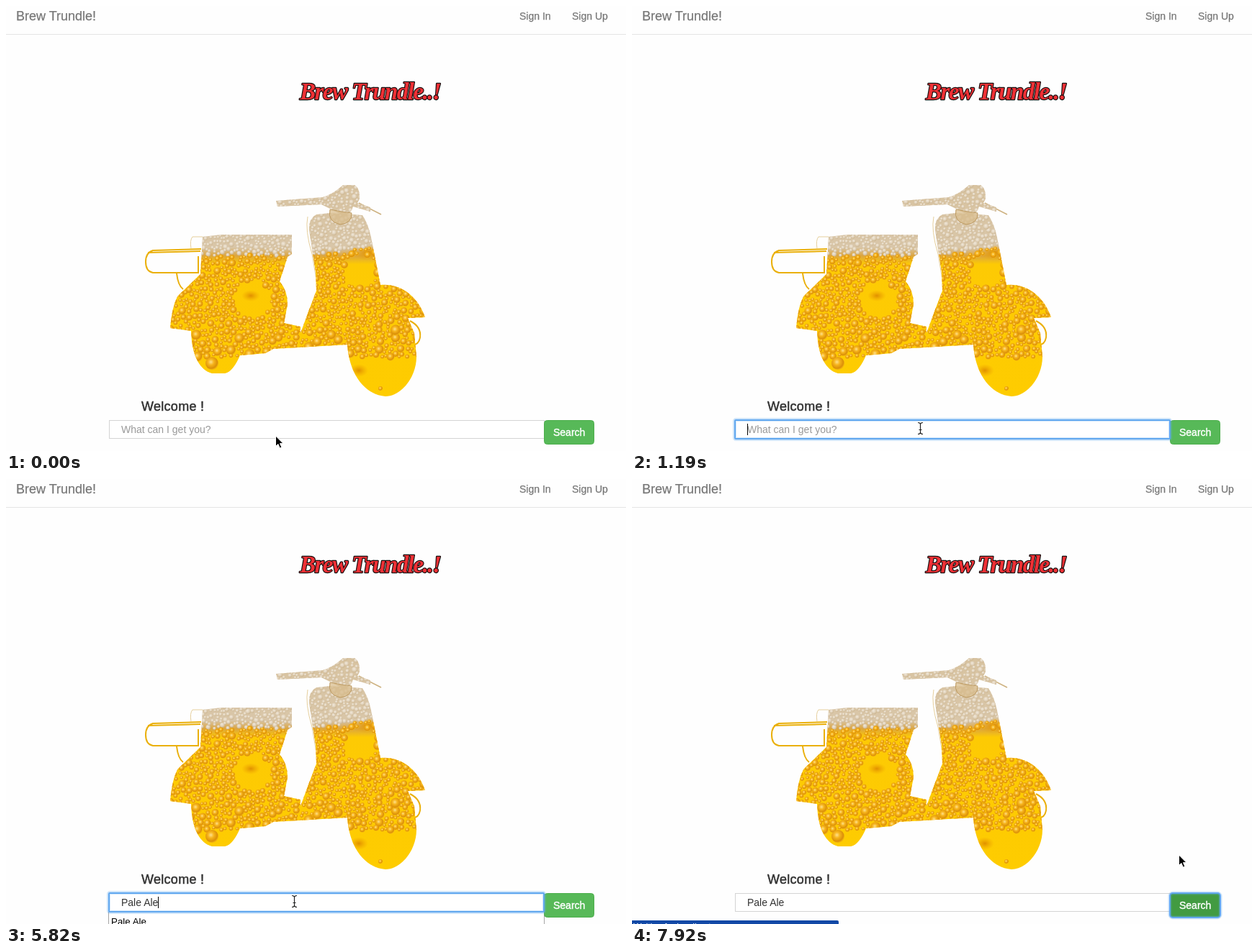
An HTML page that plays this animation: 861x619 px, repeating every 8 s.

```html
<!DOCTYPE html>
<html lang="en">
<head>
<meta charset="utf-8">
<title>Brew Trundle!</title>
<style>
html, body { margin: 0; width: 100%; height: 100%; overflow: hidden; background: #fefefe; }
svg { display: block; font: 14px "Liberation Sans", Arial, sans-serif; }
text { white-space: pre; }
.nav { fill: #777; stroke: #777; stroke-width: .25; }
.title {
  font: italic bold 33px "Liberation Serif", serif; letter-spacing: -1.5px;
  fill: #ee3035; stroke: #161010; stroke-width: 2.4px; paint-order: stroke; stroke-linejoin: round;
}
.ring { fill: none; stroke: #62a8ef; stroke-width: 2; }
.glow { fill: none; stroke: #62a8ef; stroke-width: 5; opacity: .3; }
.wire { fill: none; stroke: #eab00c; stroke-width: 2; }
.foam { fill: url(#froth); }
.drop { fill: url(#drop); }
</style>
</head>
<body>
<svg width="861" height="619" viewBox="0 0 861 619">
  <defs>
    <linearGradient id="beer" gradientUnits="userSpaceOnUse" x1="0" x2="0" y1="250" y2="545">
      <stop offset="0" stop-color="#d8c3a0"/>
      <stop offset=".29" stop-color="#d9c6a8"/>
      <stop offset=".33" stop-color="#dba540"/>
      <stop offset=".37" stop-color="#fdca04"/>
      <stop offset="1" stop-color="#fecc00"/>
    </linearGradient>
    <radialGradient id="drop" cx=".42" cy=".4" r=".58">
      <stop offset="0" stop-color="#ffe08a"/>
      <stop offset=".4" stop-color="#f6b41c"/>
      <stop offset=".85" stop-color="#db8f08"/>
      <stop offset="1" stop-color="#f0b010"/>
    </radialGradient>
    <radialGradient id="froth" cx=".42" cy=".36" r=".62">
      <stop offset="0" stop-color="#f1e8da"/>
      <stop offset=".6" stop-color="#dfd0b8"/>
      <stop offset="1" stop-color="#cdb691"/>
    </radialGradient>
    <radialGradient id="stain">
      <stop offset="0" stop-color="#e09000"/>
      <stop offset="1" stop-color="#efa400" stop-opacity="0"/>
    </radialGradient>
    <clipPath id="scooter">
      <path d="M273 321L300 318 397 318V345L391 349 380 383Q391 396 391 415L386 441 409 446V455L420 425 431 396
        430 370 421 312Q420 296 431 290L450 288 495 291Q503 303 507 322L520 388C550 386 572 405 582 433
        L558 434 567 455 570 488C570 516 549 543 527 543C500 541 477 515 474 471L371 477 360 483 325 486
        Q315 509 304 511H286C268 506 258 485 257 452L228 448Q231 415 239 403L270 373Z"/>
      <path d="M375 271L440 266Q454 262 468 249L484 249Q492 254 491 268L488 274 506 280 506 286 482 279
        Q478 292 466 290L438 276 377 279Z"/>
    </clipPath>
  </defs>

  <path d="M0 39.5H861" stroke="#e4e4e4"/>
  <g class="nav">
    <text x="14" y="20" font-size="18">Brew Trundle!</text>
    <text x="713" y="19">Sign In</text>
    <text x="786" y="19">Sign Up</text>
  </g>
  <text class="title" x="408" y="130">Brew Trundle..!</text>

  <path class="wire" d="M271 338L204 340Q194 343 194 356T204 371L267 371V348M197 343L270 341M237 372Q239 389 246 394"/>
  <path class="wire" d="M561 438Q577 446 575 461 573 473 561 471"/>
  <path d="M273 321H259Q255 326 257 337M419 293Q415 312 425 345L431 381" fill="none" stroke="#e6cf9c"/>
  <path d="M490 274L521 290" stroke="#cdb17f" stroke-width="1.5"/>
  <g clip-path="url(#scooter)">
    <rect x="190" y="240" width="400" height="310" fill="url(#beer)"/>
    <g fill="url(#stain)">
      <ellipse cx="340" cy="403" rx="13" ry="8"/>
      <ellipse cx="490" cy="507" rx="13" ry="9"/>
      <ellipse cx="503" cy="343" rx="24" ry="11"/>
    </g>
    <g id="bubbles"></g>
    <circle class="drop" cx="286" cy="497" r="9"/>
    <circle class="drop" cx="520" cy="532" r="3"/>
  </g>
  <path d="M450 283Q446 300 464 304 481 302 480 288L466 286Z" fill="#d9bd8d" fill-opacity=".75" stroke="#bd9a61"/>

  <text x="188" y="563" font-size="18" letter-spacing=".3" fill="#333" stroke="#333" stroke-width=".5">Welcome !</text>
  <rect x="143.5" y="576.5" width="604" height="25" fill="#fff" stroke="#d4d4d4"/>
  <g id="list">
    <path d="M142.5 602V620H747.5V602" fill="#fff" stroke="#a5a5a5"/>
    <text x="146" y="620" font-size="13.33">Pale Ale</text>
  </g>
  <rect id="button" x="747.5" y="576.5" width="69" height="33" rx="4"/>
  <g id="inputRing">
    <rect class="glow" x="142.5" y="575.5" width="605" height="27" rx="2"/>
    <rect class="ring" x="143" y="576" width="604" height="26" rx="1"/>
  </g>
  <g id="buttonRing">
    <rect class="glow" x="747" y="576" width="70" height="34" rx="4"/>
    <rect class="ring" x="747" y="576" width="70" height="34" rx="4"/>
  </g>
  <text x="760" y="598" fill="#fff" stroke="#fff" stroke-width=".4">Search</text>
  <text id="entry" x="160" y="594"></text>
  <path id="caret" stroke="#000"/>
  <g id="status">
    <path d="M0 614H285Q287 614 287 616V619H0Z" fill="#1249a6"/>
    <text id="wait" x="2" y="627" font-size="12" fill="#fff">Waiting for localhost...</text>
  </g>

  <g id="pointer">
    <path id="arrow" d="M0 0V14.5L3.4 11.4 5.8 17 8.3 15.9 6 10.6H10.5Z" stroke="#fff"/>
    <path id="beam" d="M-3 -7.5Q0 -7.5 .5 -5.5 1 -7.5 4 -7.5M-3 8.5Q0 8.5 .5 6.5 1 8.5 4 8.5M.5 -6V7M-1.5 2.5H2.5" fill="none" stroke="#222" stroke-width="1.2"/>
    <path id="hand" d="M-1.5 -7Q0 -8.5 1 -7L2 -2 7 -1.5 9 0V4L7 9H0L-5 2Q-5 0 -3 .5L-1 2ZM2 3V6M4.5 3V6" fill="#fff" stroke="#111"/>
  </g>
</svg>
<script>
const LOOP = 8000, FOCUS = 1190, CLICK = 7170, LOAD = 7320, LEAVE = 7920;
const STEP = 148, STEPS = 6, BLINK = 440;
const WORD = "Pale Ale";
const keyTimes = [2240, 3280, 3880, 4180, 4480, 5070, 5520, 5820];
const rest = [374.5, 598], field = [400, 587], search = [782, 598], away = [759.5, 523];

const el = id => document.getElementById(id);
const show = (id, on) => el(id).style.display = on ? "" : "none";

let seed = 7;
const random = () => (seed = seed * 16807 % 2147483647) / 2147483647;

// bubble-free patches: x, y, radius
const calm = [[342, 408, 27], [492, 368, 23]];

// tightly packed random bubbles: fine foam on top, larger ones towards the front
function fillBubbles() {
  const drops = [];
  let markup = "";
  for (let i = 0; i < 16000; i++) {
    const x = 228 + random() * 354, y = 248 + random() * 240, size = random() ** 2;
    const foam = y < 347 - Math.max(0, x - 430) * .15;
    const near = ([a, b, r]) => Math.hypot(a - x, b - y) < r;
    if (!foam && calm.some(near)) continue;
    const r = foam ? 2 + size * 2 : 2.4 + size * (x > 475 || y > 455 ? 5 : 3);
    if (drops.some(([a, b, q]) => near([a, b, (q + r) * .8]))) continue;
    drops.push([x, y, r]);
    markup += `<circle class="${foam ? "foam" : "drop"}" cx="${x}" cy="${y}" r="${r}"/>`;
  }
  el("bubbles").innerHTML = markup;
}

// moves from a to b in even steps along an arc bent by (dx, dy)
function glide(t, begin, a, b, dx, dy) {
  const p = Math.min(1, (Math.floor((t - begin) / STEP) + 1) / STEPS);
  const bend = Math.sin(Math.PI * p);
  return [a[0] + (b[0] - a[0]) * p + dx * bend, a[1] + (b[1] - a[1]) * p + dy * bend];
}

function pointerAt(t) {
  if (t < 300) return rest;
  if (t < 6270) return glide(t, 300, rest, field, 400, -482);
  return t < LEAVE ? glide(t, 6270, field, search, 0, -50) : away;
}

function draw(now) {
  const t = now % LOOP;
  const [x, y] = pointerAt(t);
  const overInput = x > 143 && x < 747 && y > 576 && y < 597;
  const overButton = x >= 747 && x < 817 && y > 576 && y < 610;
  const pressed = t >= CLICK, focused = t >= FOCUS && !pressed;

  el("pointer").setAttribute("transform", `translate(${x} ${y})`);
  show("beam", overInput);
  show("hand", overButton);
  show("arrow", !overInput && !overButton);

  const count = keyTimes.filter(k => k <= t).length;
  const entry = el("entry");
  entry.textContent = count ? WORD.slice(0, count) : "What can I get you?";
  entry.setAttribute("fill", count ? "#333" : "#999");
  const end = 160.5 + (count && Math.floor(entry.getSubStringLength(0, count)));
  const lastKey = count ? keyTimes[count - 1] : FOCUS;
  el("caret").setAttribute("d", `M${end} 581V597`);
  show("caret", focused && (t - lastKey) % (2 * BLINK) < BLINK);

  show("inputRing", focused);
  show("list", count && !pressed);
  show("buttonRing", pressed);
  const dark = overButton || pressed;
  el("button").setAttribute("fill", dark ? "#429b42" : "#57b958");
  el("button").setAttribute("stroke", dark ? "#398439" : "#4cae4c");
  show("status", t >= LOAD);
  show("wait", t >= LOAD + STEP);
}

fillBubbles();
const start = performance.now();
function tick() {
  draw(performance.now() - start);
  requestAnimationFrame(tick);
}
tick();
</script>
</body>
</html>
```
